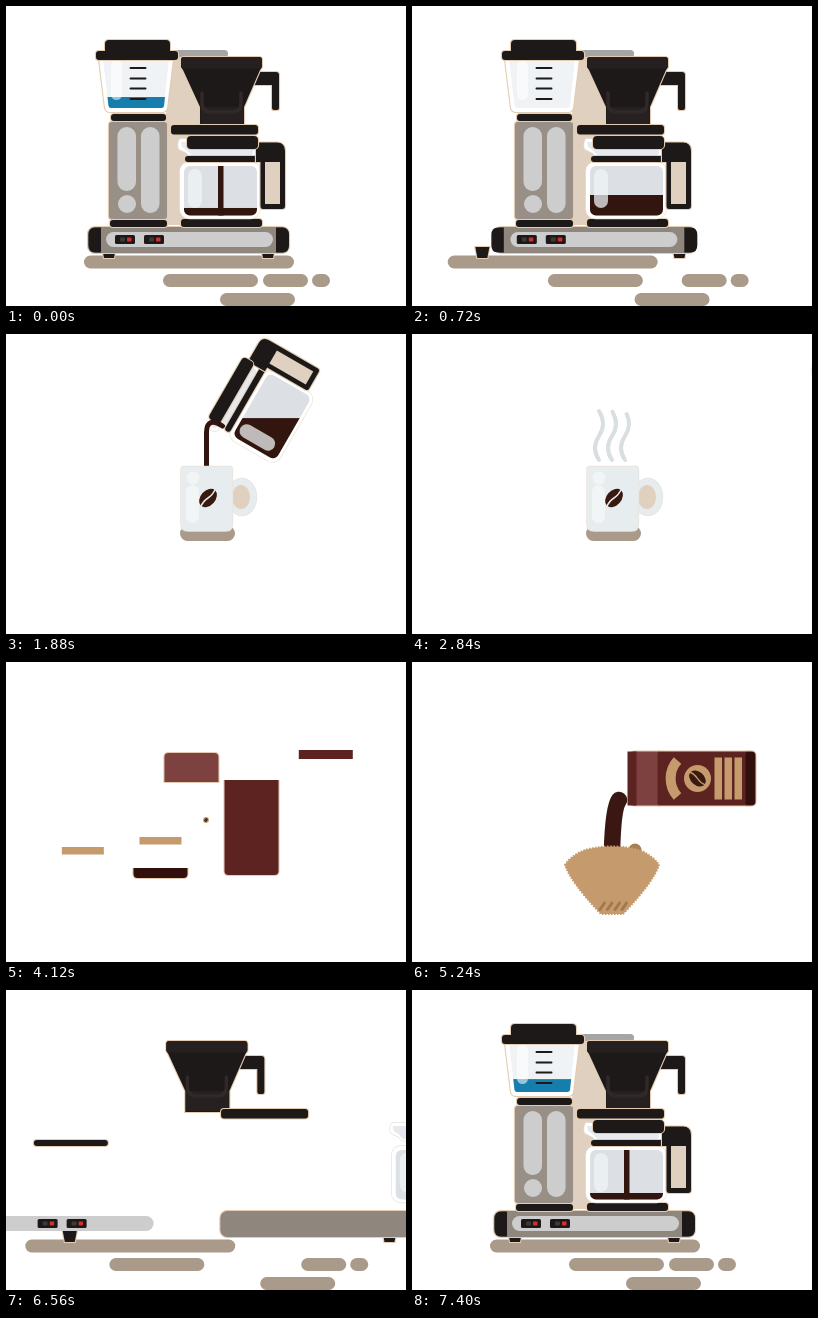
An HTML page for the animation above (7.44 s loop, 400 px wide and 300 px high).

```html
<!DOCTYPE html>
<html lang="en">
<head>
<meta charset="utf-8">
<title>Coffee time</title>
<style>
  html, body { margin: 0; width: 100%; height: 100%; overflow: hidden; background: #fff; }
  svg { display: block; width: 100vw; height: 100vh; }
  .edge { stroke: #e3ccb2; stroke-width: 2.2; paint-order: stroke; }
  .soft { stroke: #e8e2da; stroke-width: 1.4; paint-order: stroke; }
</style>
</head>
<body>
<svg id="stage" viewBox="0 0 400 300"></svg>
<script>
const LOOP = 7440, FAR = 330, REBUILD = 6390;
const INK = '#1d1918', SHADE = '#a99a8a', CREAM = '#dfd0bf', GLASS = '#dce0e4';
const BREW = '#33150f', TAN = '#c59b6d', MAROON = '#5c2321', PALE = '#cdcdcd';

const rect = (x, y, w, h, r = 0, fill = INK, more = '') =>
  `<rect x="${x}" y="${y}" width="${w}" height="${h}" rx="${r}" fill="${fill}" ${more}/>`;
const path = (d, fill = INK, more = '') => `<path d="${d}" fill="${fill}" ${more}/>`;
const line = (d, color, width, more = '') =>
  path(d, 'none', `stroke="${color}" stroke-width="${width}" stroke-linecap="round" ${more}`);
const circle = (x, y, r, fill) => `<circle cx="${x}" cy="${y}" r="${r}" fill="${fill}"/>`;
const group = (id, body) => `<g id="${id}">${body}</g>`;
const edge = 'class="edge"', soft = 'class="soft"';
const flow = 'pathLength="1" stroke-dasharray="1 1"';
const bean = (x, y, size, gap) =>
  `<g transform="translate(${x} ${y}) rotate(-48) scale(${size})">
    <ellipse rx="10" ry="7" fill="#3a1a10"/>${line('M-11 .5Q-5 -1.500 0 0T11 -.5', gap, 1.4)}</g>`;

// Sliding parts: side they use, arrival time, departure time (none = stays), artwork.
const parts = [];
const slide = (side, arrive, leave, body, dur = 240) => {
  const id = 'p' + parts.length;
  parts.push({ id, side, arrive, leave, dur });
  return group(id, body);
};

const toggle = x => rect(x, 229, 20, 9, 1.5) + rect(x + 5, 231.5, 5, 4, 1, '#3c3b39') +
  rect(x + 12, 231.5, 4.5, 4, 1, '#d0302f');
const foot = x => path(`M${x} 241H${x + 14}L${x + 12} 252H${x + 2}Z`, INK, edge);
const tick = y => line(`M124.500 ${y}H139.500`, INK, 2);
const tankShape = 'M97 53H163L158 100Q157.500 102 155.500 102H105Q103 102 102.500 100Z';

const machine = [
  slide(-1, 6456, 600, rect(78, 249.5, 210, 13, 6.5, SHADE)),
  slide(-1, 6452, 625, rect(157, 268, 95, 13, 6.5, SHADE)),
  slide(1, 6438, 640, rect(257, 268, 45, 13, 6.5, SHADE) + rect(306, 268, 18, 13, 6.5, SHADE)),
  slide(1, 6440, 650, rect(214, 287, 75, 13, 6.5, SHADE)),
  slide(1, 6690, 898, rect(150, 44, 72, 7.5, 3.5, '#a5a5a5')),
  slide(-1, 6650, 840, rect(160, 51, 36, 168, 2, CREAM)),
  slide(-1, 6439, 610, foot(96)),
  slide(1, 6493, 660, foot(255)),
  slide(1, 6498, 690, rect(82, 221, 201, 26, 7, '#8f867d', edge)),
  slide(-1, 6570, 670, path('M95 221.500V246.500H89Q82.500 246.500 82.500 239V229Q82.500 221.500 89 221.500Z')),
  slide(1, 6580, 675, path('M270 221.500H276.500Q283 221.500 283 229V239Q283 246.500 276.500 246.500H270Z')),
  slide(-1, 6492, 680, rect(100, 226, 167, 15, 7.5, PALE)),
  slide(-1, 6469, 665, toggle(109) + toggle(138)),
  slide(1, 6590, 710, rect(175, 213, 81, 8, 3, INK, edge)),
  slide(-1, 6600, 730, rect(104, 214, 57, 7, 3, INK, edge)),
  slide(1, 6620, 760, rect(103, 116, 58, 97, 3, '#989087', edge)),
  slide(-1, 6670, 745, rect(111.5, 121, 18.5, 64, 9, PALE) + circle(121, 198, 9, PALE)),
  slide(1, 6690, 750, rect(135, 121, 18.5, 86, 9, PALE)),
  slide(-1, 6640, 780, rect(105, 108, 55, 7, 3, INK, edge)),
  slide(1, 6720, 800,
    path('M93 53H167L161 102Q160 106 156 106H104Q100 106 99 102Z', '#fff', edge) +
    path(tankShape, '#eff3f6') +
    `<g clip-path="url(#tank)">${rect(95, 91, 75, 30, 0, '#157ead', 'id="water"')}</g>` +
    rect(105, 54, 11, 40, 5.5, '#fff', 'opacity=".55"') +
    [62, 72.5, 82.5, 93].map(tick).join('')),
  slide(-1, 6760, 820, path('M99 45V38Q99 34 103 34H160Q164 34 164 38V45H169Q172 45 172 48V51Q172 54 169 54H93Q90 54 90 51V48Q90 45 93 45Z', INK, edge)),
  slide(-1, 6406, 790,
    path('M244 66H270Q273 66 273 69V102Q273 104 271 104H268Q266 104 266 102V79H240Z', INK, edge) +
    path('M178 51H253Q256 51 256 54V61L254 64L238 101V122H194V101L177 64L175 61V54Q175 51 178 51Z', INK, edge) +
    rect(175, 51, 81, 11.5, 3, '#25201f') + rect(194.5, 101, 43, 20, 1, '#262120') +
    line('M196 87V97Q196 106 205 106H226Q235 106 235 97V87', '#302928', 3.5)),
  slide(1, 6449, 770, rect(165, 119, 87, 9.5, 3, INK, edge))
].join('');

const pot =
  slide(1, 6528, null,
    path('M174 133H250V147Q250 151 246 151H189Q183 151 181 147L173 143Q171 138 174 133Z', '#fff', soft) +
    path('M175 136H247V146Q247 149.500 243 149.500H190Q184 149.500 182 145L176 141Z', '#e6eaef') +
    rect(174, 156, 80, 56.5, 9, '#fff', soft) + rect(178, 160, 73, 49.5, 6, GLASS) +
    `<g clip-path="url(#jar)">${rect(114, 185, 200, 150, 0, BREW, 'id="coffee"')}
      ${rect(212, 156, 5.5, 54, 0, BREW, 'id="drip"')}</g>` +
    rect(182, 163, 14, 39, 7, '#eff4f5', 'opacity=".74"')) +
  slide(-1, 6506, null, rect(179, 150, 74, 6, 3, INK, edge)) +
  slide(1, 6660, null,
    path('M250 136.500H271Q279 136.500 279 145V200Q279 203 276 203H257Q254.500 203 254.500 200V156H250Z', INK, edge) +
    rect(259, 156, 15, 42, 0, CREAM)) +
  slide(-1, 6700, null, rect(181, 130, 71, 13, 4, INK, edge));

const mug =
  rect(174, 192, 55, 15, 7.5, SHADE) +
  `<ellipse cx="236" cy="163" rx="14.5" ry="18.500" fill="#e7ecee" ${soft}/>
   <ellipse cx="235" cy="163" rx="9" ry="12" fill="${CREAM}"/>` +
  path('M178 132.500H223.500Q226.500 132.500 226.500 135.500V190Q226.500 197 220 197H182Q175 197 175 190V135.500Q175 132.500 178 132.500Z', '#e7ecee', soft) +
  circle(187, 144, 6.5, '#f1f5f6') + rect(180, 151, 13, 38, 6.5, '#f1f5f6') +
  bean(202, 164, 1.05, '#e7ecee');

const steam = [187, 200, 213].map(x =>
  line(`M${x} 126Q${x - 8} 114 ${x} 102T${x} 77`, '#d9dee1', 4, flow + ' data-steam')).join('');

// The open tops leave no seam where the pieces of the bag meet.
const stripe = (side, start, y) => slide(side, start, null, rect(179, y, 42, 7.5, 0, TAN), 300);
const bag =
  slide(-1, 3927, null, path('M173 120V95Q173 91 177 91H223Q227 91 227 95V120Z', '#7d4140', edge), 300) +
  slide(1, 3976, null, path('M173 118V209Q173 213 177 213H223Q227 213 227 209V118', MAROON, edge), 300) +
  slide(-1, 3976, null, path('M173 206V212Q173 216 177 216H223Q227 216 227 212V206', '#320f0d', edge), 300) +
  slide(1, 4035, null, rect(173, 88, 54, 9, 0, MAROON), 300) +
  stripe(-1, 3976, 175) + stripe(-1, 4037, 185) + stripe(1, 4095, 195) +
  group('emblem', circle(200, 158, 13.5, TAN) + bean(200, 158, .95, TAN)) +
  group('arc', path('M182 138A27 27 0 0 1 218 138', 'none', `stroke="${TAN}" stroke-width="10"`));

const filter =
  circle(223, 188, 6.5, '#a97f4e') +
  path('M153 203Q157 196 168 190Q180 184.500 200 184.500T232 190Q243 196 247 203Q242 219 213 250L211 252H189L187 250Q158 219 153 203Z',
    TAN, `stroke="${TAN}" stroke-width="2" stroke-dasharray="1.5 1.5"`) +
  [188, 195.5, 203, 210].map(x => line(`M${x} 247.500L${x + 4.5} 241`, '#a3794a', 3)).join('');

stage.innerHTML =
  `<defs>
    <clipPath id="jar">${rect(178, 160, 73, 49.5, 6)}</clipPath>
    <clipPath id="tank">${path(tankShape)}</clipPath>
  </defs>` +
  group('machine', machine) + group('pot', pot) +
  line('M216.500 92Q200.500 82 200.500 99V136', BREW, 5, flow + ' id="pour"') +
  group('mug', steam + mug) +
  line('M207 138Q201 146 200 190', '#3a1712', 16.5, flow + ' id="grounds"') +
  group('filter', filter) + group('bag', bag);

const el = id => document.getElementById(id);
const clamp = v => Math.min(1, Math.max(0, v));
const linear = p => p;
const easeIn = p => p ** 3;
const easeOut = p => 1 - (1 - p) ** 3;
const easeInOut = p => p < .5 ? 4 * p ** 3 : 1 - 4 * (1 - p) ** 3;
const within = (t, a, b) => t >= a && t < b;

// Steps are [time, value]; holds before the first and after the last.
function track(t, steps, ease = easeInOut) {
  let value = steps[0][1];
  for (let i = 1; i < steps.length; i++) {
    const [t0, v0] = steps[i - 1], [t1, v1] = steps[i];
    if (t >= t0) value = v0 + (v1 - v0) * ease(clamp((t - t0) / (t1 - t0)));
  }
  return value;
}
const show = (node, on) => node.setAttribute('visibility', on ? 'inherit' : 'hidden');
const move = (id, value) => el(id).setAttribute('transform', value);

function stream(node, t, start, full, stop, end) {
  show(node, t > start && t < end);
  node.setAttribute('stroke-dashoffset', track(t, [[start, 1], [full, 0], [stop, 0], [end, -1]], linear));
}

function grow(id, t, start, x, y) {
  const s = track(t, [[start, 0], [start + 270, 1]], easeOut);
  move(id, `translate(${x} ${y}) scale(${s}) translate(${-x} ${-y})`);
}

function render(t) {
  const arriving = t > 3000;
  for (const { id, side, arrive, leave, dur } of parts) {
    let shift = 0, on = true;
    if (arriving) {
      shift = FAR * (1 - easeOut(clamp((t - arrive) / dur)));
      on = t > arrive;
    } else if (leave) {
      shift = FAR * easeIn(clamp((t - leave) / dur));
      on = t < leave + dur;
    }
    move(id, `translate(${side * shift} 0)`);
    show(el(id), on);
  }

  show(el('machine'), t < 1200 || t >= REBUILD);
  el('water').setAttribute('y', arriving
    ? track(t, [[7130, 76], [LOOP, 91]], linear)
    : track(t, [[0, 91], [560, 102]], linear));

  // The pot is back in its home position when the machine is rebuilt.
  const served = arriving ? 0 : t;
  const angle = track(served, [[1540, 0], [1800, -60], [2330, -60], [2600, 0]]);
  const x = track(served, [[1180, 0], [1520, 52], [2480, 52], [3000, 250]]);
  const y = track(served, [[1180, 0], [1520, -102]]);
  const level = arriving
    ? track(t, [[7130, 25], [LOOP, 17]], linear)
    : track(t, [[0, 17], [600, 4], [1780, 4], [1880, 1], [2300, 46]], linear);
  show(el('pot'), t < 3000 || t >= REBUILD);
  move('pot', `translate(${x} ${y}) rotate(${angle} 214 185)`);
  el('coffee').setAttribute('y', 185 + level);
  move('coffee', `rotate(${-angle} 214 185)`);
  show(el('drip'), t < 600 || t >= 7140);
  stream(el('pour'), t, 1780, 1860, 2230, 2340);

  show(el('mug'), within(t, 1476, 3560));
  move('mug', `translate(0 ${track(t, [[1476, 130], [1740, 0]], easeOut)})`);
  document.querySelectorAll('[data-steam]').forEach((puff, i) => {
    const start = 2480 + i * 60;
    show(puff, within(t, start, 3560));
    puff.setAttribute('stroke-dashoffset', track(t, [[start, 1], [start + 400, 0]], easeOut));
  });

  const bagX = track(t, [[4660, 0], [5000, 79.5], [5500, 79.5], [5820, 310]]);
  const bagY = track(t, [[4660, 0], [5000, -35.5], [5500, -35.5], [5820, -160]]);
  const tilt = track(t, [[4660, 0], [5000, -90]]);
  const bagOn = within(t, 3910, 5820);
  el('bag').setAttribute('display', bagOn ? 'inline' : 'none');
  move('bag', `translate(${bagX} ${bagY}) rotate(${tilt} 200 152)`);
  grow('emblem', t, 4100, 200, 158);
  grow('arc', t, 4360, 200, 135);
  stream(el('grounds'), t, 5000, 5160, 5360, 5520);

  show(el('filter'), within(t, 4670, 6080));
  move('filter', `translate(0 ${t < 5400
    ? track(t, [[4670, 125], [4960, 0]], easeOut)
    : track(t, [[5760, 0], [6080, 125]], easeIn)})`);

  el('mug').setAttribute('display', within(t, 1476, 3560) ? 'inline' : 'none');
}

const begin = performance.now();
function play() {
  render((performance.now() - begin) % LOOP);
  requestAnimationFrame(play);
}
play();
</script>
</body>
</html>
```
